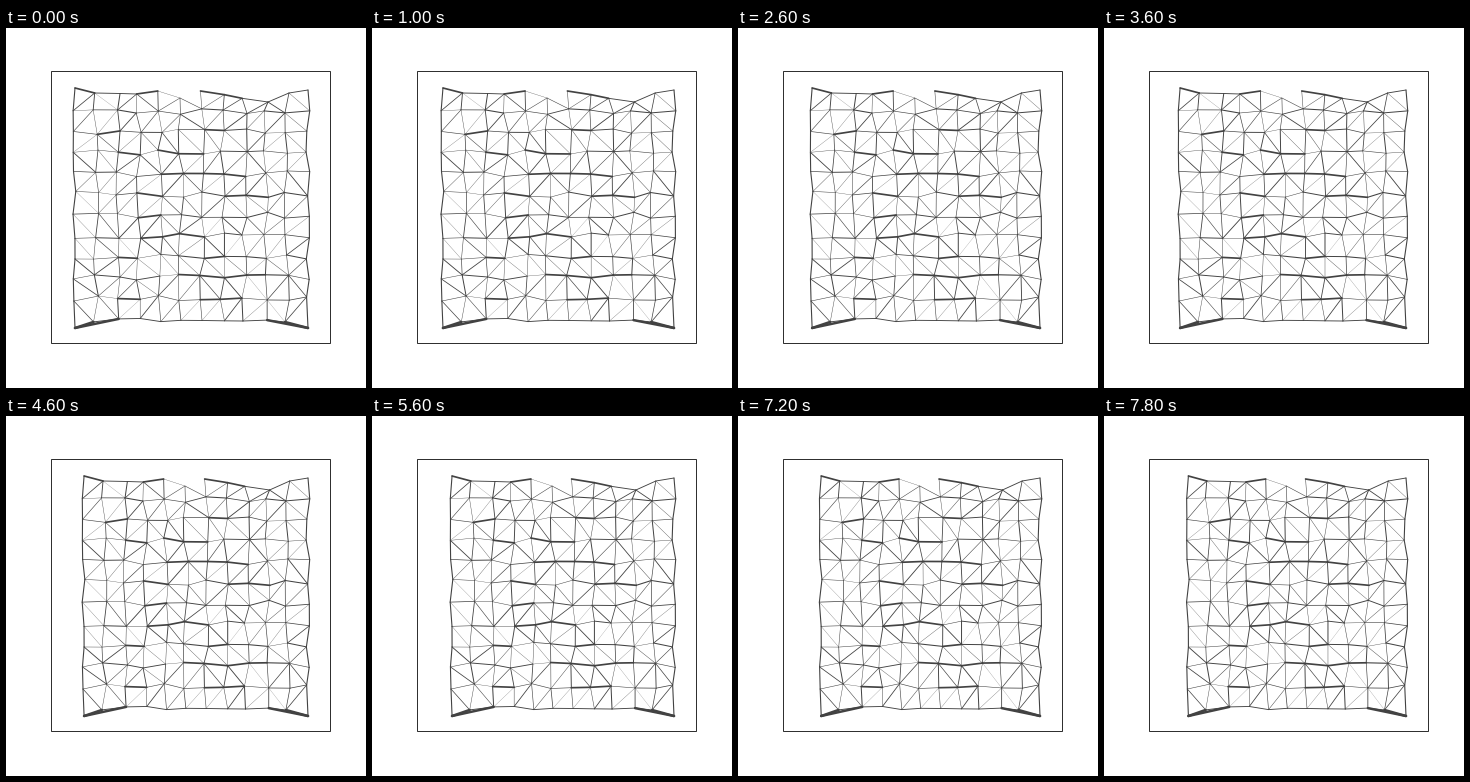
Animation, 360 px wide and 360 px high, one loop 8000 ms. Source, as a matplotlib script:

```python
import numpy as np
import matplotlib.pyplot as plt
from matplotlib.animation import FuncAnimation
from matplotlib.collections import LineCollection
from matplotlib.patches import Rectangle

SIZE, DPI = 360, 100
PX = 72 / DPI
N = 12                      # joints per side
LAST = N - 1
LEFT, RIGHT = 69, 302
TOP, BOTTOM = 62.5, 291
FRAMES, STEP = 40, 200
PUSH = 15.4                 # travel of the left side over one loop
INK = "#424242"

# heavy horizontal members: row -> (first column, last column) runs
HEAVY = {
    0: [(0, 1), (3, 4), (6, 8)],
    2: [(1, 2), (6, 7)],
    3: [(2, 3), (4, 6)],
    4: [(4, 8)],
    5: [(3, 4), (7, 9)],
    6: [(3, 4)],
    7: [(3, 6)],
    8: [(2, 3), (6, 7)],
    9: [(5, 9)],
    10: [(2, 3), (6, 8)],
}

rng = np.random.default_rng(12)


def make_nodes():
    """Jittered square grid with a wavy top and drooping lower corners."""
    x, y = np.meshgrid(np.linspace(LEFT, RIGHT, N), np.linspace(TOP, BOTTOM, N))
    x[:, 1:-1] += rng.uniform(-3, 3, (N, N - 2))
    x[1:-1, [0, -1]] += rng.uniform(-2, 2, (N - 2, 2))
    y[1:] += rng.uniform(-3, 3, (N - 1, N))
    y[0] = np.interp(range(N), [0, 1, 3, 4, 5, 6, 9, 10, 11],
                     [60, 65, 66, 63, 70, 63, 74, 65, 62])
    y[-1, [0, -1]] = 300
    return np.stack([x, y], axis=-1)


nodes = make_nodes()
edges = {}


def link(a, b, width):
    edges[a, b] = width


def span(pair):
    return np.hypot(*(nodes[pair[0]] - nodes[pair[1]]))


for r in range(N):
    for c in range(N):
        rim_row, rim_col = r in (0, LAST), c in (0, LAST)
        if c < LAST:
            link((r, c), (r, c + 1), 0.9 if rim_row else rng.uniform(0.3, 1.1))
        if r < LAST:
            link((r, c), (r + 1, c), 1.1 if rim_col else rng.uniform(0.4, 1))
        if r < LAST and c < LAST:
            # brace each cell along its shorter diagonal
            fall = (r, c), (r + 1, c + 1)
            rise = (r, c + 1), (r + 1, c)
            link(*min(fall, rise, key=span), rng.uniform(0.15, 0.9))

for r, runs in HEAVY.items():
    for first, last in runs:
        for c in range(first, last):
            link((r, c), (r, c + 1), 1.7)

# open notch in the top side
link((0, 4), (0, 5), 0.3)
edges.pop(((0, 5), (0, 6)))

# dark wedges at the lower corners
for corner, inward in ((0, 1), (LAST, -1)):
    for k in (1, 2):
        link((LAST, corner), (LAST, corner + k * inward), 2.5)

pairs = np.array(list(edges))
widths = np.array(list(edges.values())) * PX
segments = nodes[pairs[..., 0], pairs[..., 1]]
lag = np.clip((RIGHT - segments[..., 0]) / (RIGHT - LEFT), 0, None)

fig = plt.figure(figsize=(SIZE / DPI, SIZE / DPI), dpi=DPI, facecolor="white")
ax = fig.add_axes([0, 0, 1, 1])
ax.set(xlim=(0, SIZE), ylim=(SIZE, 0))
ax.axis("off")
ax.add_patch(Rectangle((45, 43), 279, 272, fill=False,
                       edgecolor="#303030", lw=PX))
mesh = LineCollection(segments, linewidths=widths, colors=INK, capstyle="round")
ax.add_collection(mesh)


def draw(i):
    moved = segments.copy()
    moved[..., 0] += PUSH * i / (FRAMES - 1) * lag
    mesh.set_segments(moved)
    return (mesh,)


anim = FuncAnimation(fig, draw, frames=FRAMES, interval=STEP, repeat=True,
                     repeat_delay=0)
plt.show()
```
